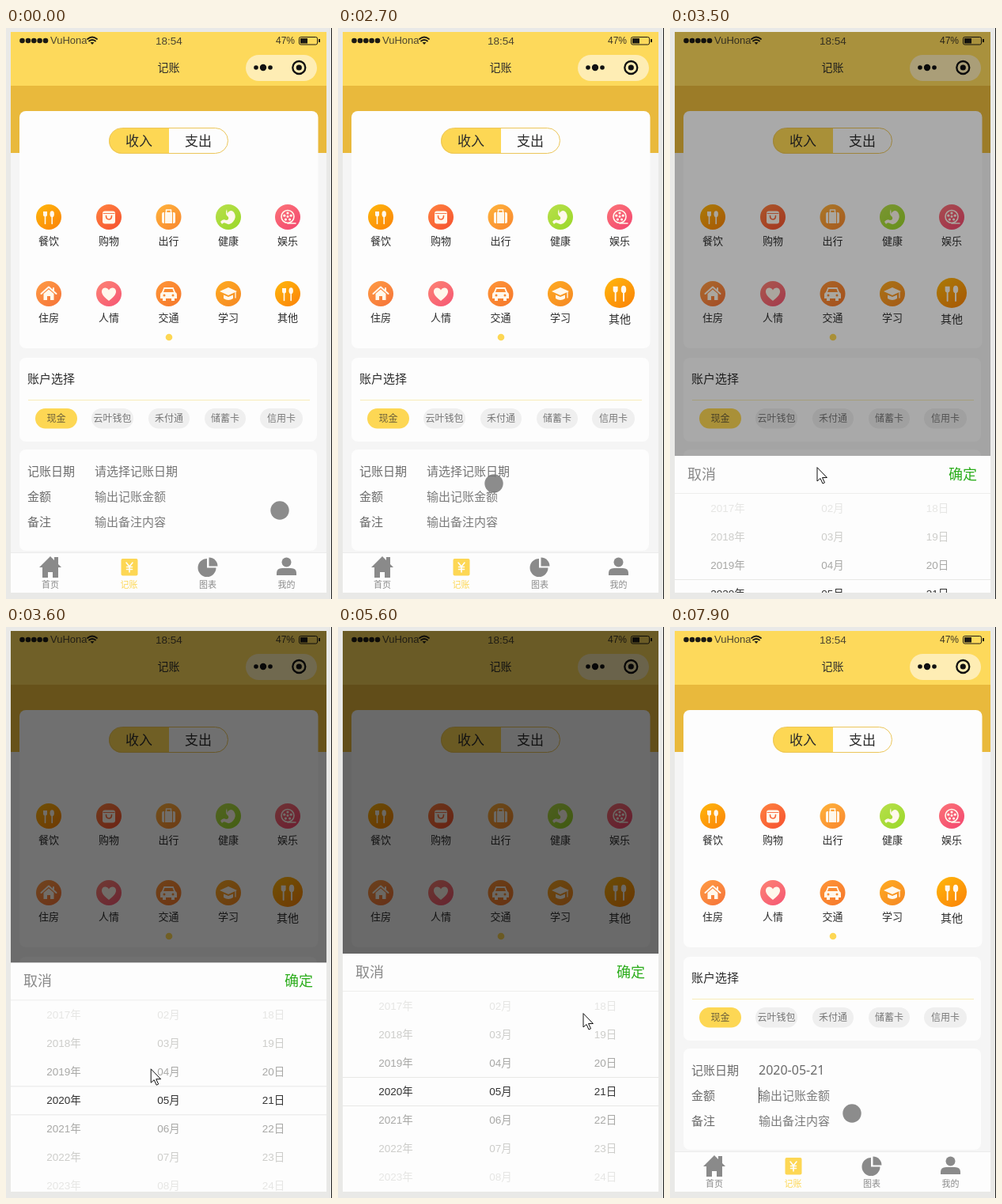
An HTML page that plays this animation: 412 by 722 pixels, repeating every 8000 ms.

```html
<!DOCTYPE html>
<html lang="zh-CN">
<head>
<meta charset="utf-8">
<title>记账</title>
<style>
html, body { margin: 0; width: 100%; height: 100%; overflow: hidden; background: #e9e9e7; }
svg { display: block; width: 412px; height: 722px; }
text { font-family: "Noto Sans CJK SC", "Noto Sans CJK", sans-serif; }
.latin { font-family: "Liberation Sans", "Noto Sans CJK SC", "Noto Sans CJK", sans-serif; }
.date { font-family: "Noto Sans", sans-serif; }
</style>
</head>
<body>
<svg id="stage" viewBox="0 0 412 722" xmlns="http://www.w3.org/2000/svg"></svg>
<script>
const LOOP = 8000, STEP = 100;
const SHEET_TOP = 413, SHEET_H = 301;
const PAPER = '#fdfdfd', YELLOW = '#fdd754', GREY = '#8a8a8a', INK = '#2b2b2b', CREAM = '#fff8ec';

// Text placed by the middle of its line
const text = (s, x, y, size, fill = INK, anchor = 'middle', extra = '') =>
  `<text x="${x}" y="${y + size * 0.37}" font-size="${size}" fill="${fill}" text-anchor="${anchor}" ${extra}>${s}</text>`;
const rect = (x, y, w, h, fill, r = 0, extra = '') =>
  `<rect x="${x}" y="${y}" width="${w}" height="${h}" rx="${r}" fill="${fill}" ${extra}/>`;
const circle = (x, y, r, fill, extra = '') =>
  `<circle cx="${x}" cy="${y}" r="${r}" fill="${fill}" ${extra}/>`;
const path = (d, fill = 'none', extra = '') => `<path d="${d}" fill="${fill}" ${extra}/>`;
const line = (w, color = CREAM) =>
  `stroke="${color}" stroke-width="${w}" stroke-linecap="round" stroke-linejoin="round"`;

const cutlery =
  path('M-7-7h5v4q0 2.500-2.500 2.500T-7-3z', CREAM) + path('M-4.500-1V8.500', 'none', line(1.6)) +
  `<ellipse cx="4.2" cy="-3.8" rx="2.7" ry="4" fill="${CREAM}"/>` + path('M4.200-1V8.500', 'none', line(1.6));

const categories = [
  ['餐饮', '#ffb80c', '#fb8608', cutlery],
  ['购物', '#ff8340', '#f65530',
    rect(-8, -7.5, 16, 16, CREAM, 3) + path('M-7-4.500h14', 'none', line(0.9, '#f9683a')) +
    path('M-3.500-1.500q0 4.500 3.500 4.500t3.500-4.500', 'none', line(1.6, '#f9683a'))],
  ['出行', '#ffb43c', '#f98a30',
    path('M-3-6v-3h6v3', 'none', line(1.6)) + rect(-8.5, -6, 17, 14, CREAM, 2) +
    path('M-5-6v14M5-6v14', 'none', line(1, '#fa9a34'))],
  ['健康', '#b8e04c', '#9cd82c',
    path('M-2-10q1 4 0 6q5-7 9-2q4 6-1 12q-4 5-9 2q-3-2-5 1l-2-3q3-4 7-2q4 0 3-4q-5-3-2-10z', CREAM)],
  ['娱乐', '#fb7478', '#f44a70',
    circle(0, -0.5, 8, 'none', line(1.6)) + circle(0, -0.5, 1.4, CREAM) +
    [0, 1, 2, 3, 4].map(i => {
      const a = i * Math.PI * 0.4 - Math.PI / 2;
      return circle(4.4 * Math.cos(a), 4.4 * Math.sin(a) - 0.5, 1.6, CREAM);
    }).join('') + path('M0 8h10', 'none', line(1.5))],
  ['住房', '#ff9c44', '#f6763a',
    path('M-9.500 0L0-8.500L9.500 0M6-7v3', 'none', line(2)) +
    path('M-6.500 0L0-5.500L6.500 0V8H2V3h-4v5h-4.500z', CREAM)],
  ['人情', '#fd8474', '#f65a74',
    path('M0 9C-5 5-9.500 1-9-3.500C-8.500-8-2.500-9 0-4.500C2.500-9 8.500-8 9-3.500C9.500 1 5 5 0 9z', CREAM)],
  ['交通', '#ff9638', '#f67a2c',
    path('M-6-8h12l2.500 6q2 1 2 3v5h-3v3h-4v-3h-7v3h-4v-3h-3v-5q0-2 2-3z', CREAM) +
    path('M-5-6h10l1.500 4h-13z', '#fa8c34') +
    circle(-5.5, 2, 1.5, '#fa8c34') + circle(5.5, 2, 1.5, '#fa8c34')],
  ['学习', '#ffac20', '#f68a24',
    path('M-11-3L0-8L11-3L0 2z', CREAM) + path('M-6 1.500L0 4l6-2.500V6q-6 4-12 0z', CREAM) +
    path('M9-2v7', 'none', line(1.3))],
  ['其他', '#ffb80c', '#fb8608', cutlery],
];
const colX = [54, 130, 205.5, 281, 356];

const gradients = categories.map(([, a, b], i) =>
  `<linearGradient id="g${i}" x2=".8" y2="1"><stop stop-color="${a}"/><stop offset="1" stop-color="${b}"/></linearGradient>`).join('');

const categoryGrid = () => categories.map(([name, , , glyph], i) => {
  const x = colX[i % 5], y = i < 5 ? 239 : 336;
  return `<g id="icon${i}" transform="translate(${x} ${y})">${circle(0, 0, 16, `url(#g${i})`)}${glyph}</g>` +
    text(name, x, y + 30, 13, INK, 'middle', `id="name${i}"`);
}).join('');

const statusBar = () =>
  [20.5, 28, 35.3, 42.6, 50].map(x => circle(x, 16, 3.3, '#1c1a14')).join('') +
  text('VuHona', 56, 15.5, 13, '#4c4530', 'start', 'class="latin"') +
  path('M103 14q6-5 12 0M105 16.500q4-3 8 0', 'none', line(1.8, '#1c1a14')) + path('M106.500 18h5l-2.500 3z', '#1c1a14') +
  text('18:54', 206, 16, 13.5, '#4c4530', 'middle', 'class="latin"') +
  text('47%', 341, 15.5, 12, '#3c3524', 'start', 'class="latin"') +
  rect(370.5, 11.5, 23, 9.5, 'none', 2, 'stroke="#1c1a14"') + rect(372, 13, 9, 6.5, '#1c1a14') + rect(395, 14, 2, 4, '#1c1a14') +
  text('记账', 205.5, 49.5, 14) +
  rect(303, 34, 90, 33, '#feedb4', 16.5) +
  circle(316, 50, 2.8, '#111') + circle(325, 50, 4.2, '#111') + circle(334, 50, 2.8, '#111') +
  circle(370.3, 50, 8, 'none', line(2.3, '#111')) + circle(370.3, 50, 3.6, '#111');

const chips = [['现金', 37, 53], ['云叶钱包', 108, 53], ['禾付通', 180, 52], ['储蓄卡', 251, 52], ['信用卡', 321, 54]];
const accounts = () => text('账户选择', 27, 443, 15, INK, 'start') + rect(28, 470, 356, 1, '#f8ecb8') +
  chips.map(([s, x, w], i) =>
    rect(x, 481, w, 25.5, i ? '#efefef' : YELLOW, 12.7) +
    text(s, x + w / 2, 494, 12, i ? '#777' : '#6b5f3a')).join('');

const form = () =>
  ['记账日期', '金额', '备注'].map((s, i) => text(s, 27, 560 + 32 * i, 15, '#6b6b6b', 'start')).join('') +
  text('请选择记账日期', 112, 560, 15, '#737373', 'start', 'id="hint"') +
  text('2020-05-21', 112, 560, 16, '#6b6b6b', 'start', 'id="date" class="date"') +
  text('输出记账金额', 112, 592, 15, '#7b7b7b', 'start') +
  text('输出备注内容', 112, 624, 15, '#7b7b7b', 'start') +
  rect(112, 582, 1, 20, '#444', 0, 'id="caret"');

const tabBar = () =>
  rect(6, 663, 399, 51, PAPER) + rect(6, 663, 399, 1, '#ececec') +
  path('M42 682L56 668l5 5v-4h5v9l4 4h-4v13h-7v-7h-6v7h-7v-13z', GREY) +
  rect(145.5, 671, 21, 21.5, YELLOW, 2) +
  path('M152 676l4 5l4-5M156 681v7M152.500 681.500h7M152.500 684.500h7', 'none', line(1.6, PAPER)) +
  path('M254 671A11.500 11.500 0 1 0 265.500 682.500H254z', GREY) + path('M256.500 669.500A11 11 0 0 1 267.500 680.500H256.500z', GREY) +
  circle(354.5, 675.5, 6, GREY) + path('M342 692v-3q0-6 7-6h11q7 0 7 6v3z', GREY) +
  ['首页', '记账', '图表', '我的'].map((s, i) => text(s, 56 + 99.5 * i, 704, 11, i === 1 ? YELLOW : GREY)).join('');

const fade = ['#333', '#a8a8a6', '#cdcdca', '#e6e6e4'];
const two = n => String(n).padStart(2, '0');
const picker = () => {
  let s = rect(6, 0, 399, SHEET_H, PAPER) +
    text('取消', 22, 23, 18, '#8a8a8a', 'start') + text('确定', 352, 23, 18, '#2cad1c', 'start') +
    rect(6, 47, 399, 1, '#eeeeec') + rect(6, 156, 399, 1, '#e8e8e6') + rect(6, 192, 399, 1, '#e8e8e6');
  for (let d = -3; d <= 3; d++) {
    const row = [`${2020 + d}年`, `${two(5 + d)}月`, `${21 + d}日`];
    row.forEach((v, c) => {
      s += text(v, 73 + 132.5 * c, 174 + 36 * d, 13.5, fade[Math.abs(d)], 'middle', 'class="latin"');
    });
  }
  return s;
};

const cursors = {
  dot: circle(0, 0, 11.7, '#787878', 'fill-opacity=".85"'),
  arrow: path('M0 0V17l4-3.500l3 6.500l2.500-1.200l-3-6.300h5.500z', '#fff', line(1, '#111')),
  hand: path('M-1.500 1.500q0-1.500 1.500-1.500t1.500 1.500v7l1-.5q2 0 2.500 1.500q2-.5 2.700 1.200q2.300-.2 2.300 2v4q0 3-2 5v2.500h-8v-2l-6-8q-1.500-2.500 1-2.500l3.500 3z', '#fff', line(1.1, '#111')) +
    path('M1.500 8v4M5 9.500v3M7.700 11v2', 'none', line(1, '#111')),
};

const stage = document.getElementById('stage');
stage.innerHTML = `<defs>${gradients}<clipPath id="screen">${rect(6, 5, 399, 709, '#000')}</clipPath></defs>` +
  rect(0, 0, 412, 722, '#e9e9e7') + rect(411, 0, 1, 722, '#222') +
  '<g clip-path="url(#screen)">' +
  rect(6, 5, 399, 709, '#f5f5f5') + rect(6, 73, 399, 85, '#e9b93c') + rect(6, 5, 399, 68, '#fdd95b') +
  statusBar() +
  rect(17, 105, 377.5, 300, PAPER, 8) +
  rect(17, 417, 376, 106, PAPER, 8) + rect(17, 533, 376, 128, PAPER, 8) +
  path('M206 127h-60a16 16 0 0 0 0 32h60z', YELLOW) +
  rect(130.5, 126.5, 150, 32, 'none', 16, 'stroke="#ecc65a"') +
  text('收入', 168, 143, 17) + text('支出', 243, 143, 17) +
  categoryGrid() + circle(206, 391, 4.3, YELLOW) +
  accounts() + form() + tabBar() +
  rect(6, 5, 399, 709, '#000', 0, 'id="mask"') +
  `<g id="sheet">${picker()}</g></g>` +
  Object.entries(cursors).map(([k, s]) => `<g id="${k}">${s}</g>`).join('');

const $ = id => document.getElementById(id);
const show = (id, on) => $(id).setAttribute('visibility', on ? 'visible' : 'hidden');
const ease = u => { u = Math.min(1, Math.max(0, u)); return u * u * (3 - 2 * u); };

// Pointer route: time, x, y
const route = [
  [0, 346, 610], [900, 397, 450], [1000, 396, 430], [1700, 362, 346], [1900, 362, 346],
  [2700, 197, 576], [2900, 198, 577], [3000, 186, 556], [3500, 186, 556], [4000, 172, 572],
  [4200, 190, 590], [4500, 270, 608], [5000, 372, 432], [5200, 372, 432], [5600, 310, 489],
  [6100, 369, 437], [6600, 369, 437], [7000, 240, 640], [7200, 230, 615], [8000, 230, 615],
];
const pointerAt = t => {
  const i = route.findIndex((p, n) => n && t <= p[0]);
  const [t0, x0, y0] = route[i - 1], [t1, x1, y1] = route[i];
  const u = (t - t0) / (t1 - t0);
  return [x0 + (x1 - x0) * u, y0 + (y1 - y0) * u];
};

function render(t) {
  const open = ease((t - 3335) / 300) * (1 - ease((t - 6230) / 300));
  $('mask').setAttribute('opacity', 0.58 * open);
  $('sheet').setAttribute('transform', `translate(0 ${SHEET_TOP + SHEET_H * (1 - open)})`);

  const picked = t >= 1600;
  $('icon9').setAttribute('transform', picked ? 'translate(356 335) scale(1.19)' : 'translate(356 336)');
  $('name9').setAttribute('font-size', picked ? 14 : 13);
  $('name9').setAttribute('y', picked ? 373.2 : 370.8);

  const dated = t >= 6300;
  show('hint', !dated);
  show('date', dated);
  show('caret', t >= 7500);

  const [x, y] = pointerAt(t);
  const kind = t < 3000 || t >= 6700 ? 'dot' : x > 345 && y < 460 ? 'hand' : 'arrow';
  for (const k in cursors) show(k, k === kind);
  $(kind).setAttribute('transform', `translate(${x} ${y})`);
}

const start = performance.now();
function tick() {
  const t = (performance.now() - start) % LOOP;
  render(Math.floor(t / STEP) * STEP);
  requestAnimationFrame(tick);
}
tick();
</script>
</body>
</html>
```
